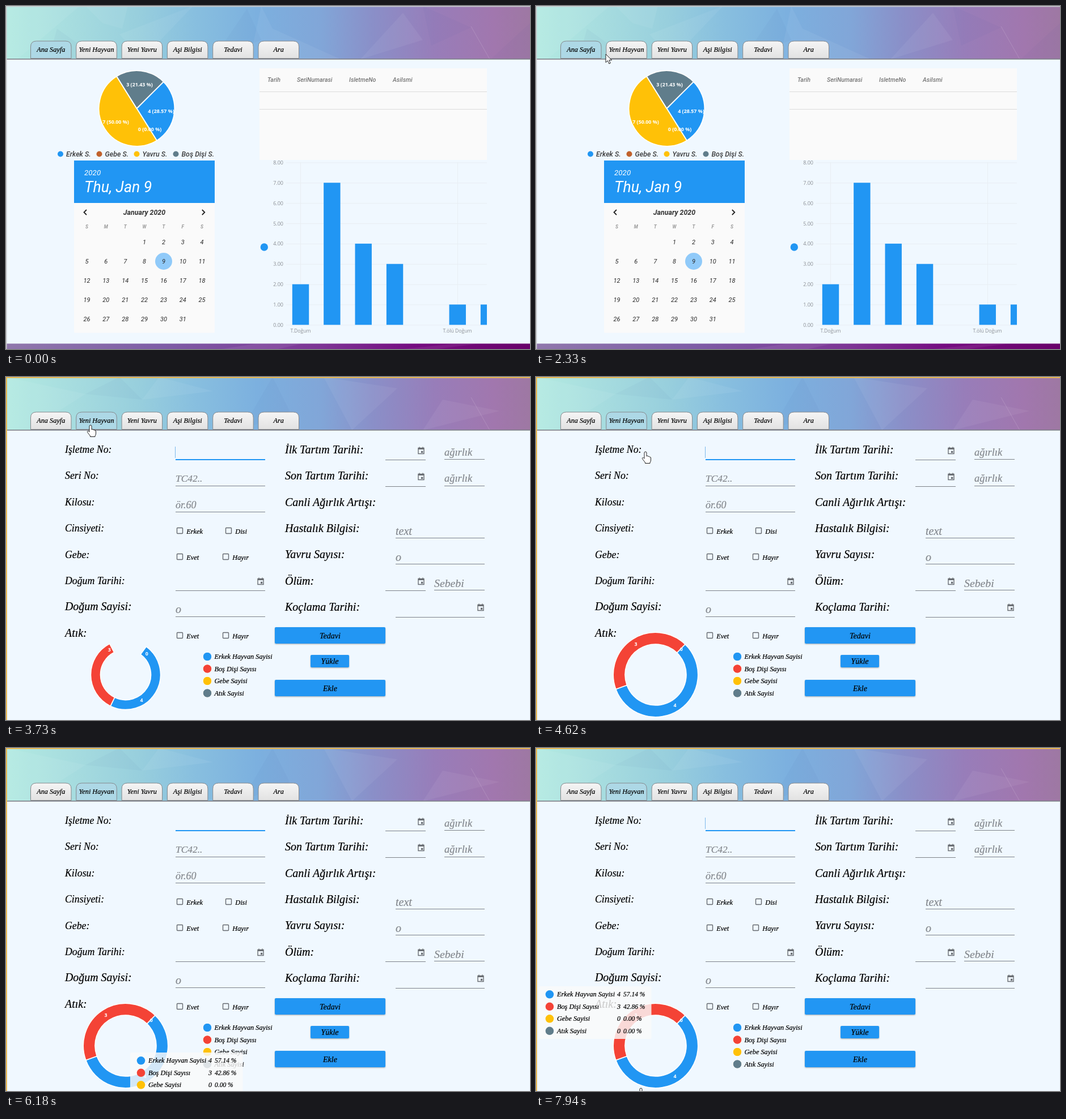
Animation, 924 px wide and 606 px high, one loop 7.99 s. Source, as an HTML page:

```html
<!DOCTYPE html>
<html lang="tr">
<head>
<meta charset="utf-8">
<title>Dashboard</title>
<style>
html, body { margin: 0; width: 100%; height: 100%; overflow: hidden; background: #f0f8ff; }
svg { display: block; width: 924px; height: 606px; }
text { white-space: pre; }
.serif { font-family: "Liberation Serif", serif; font-style: italic; stroke-width: .22px; }
.ui { font-family: Roboto, sans-serif; font-style: italic; stroke: none; }
.chart { font-family: "Open Sans", sans-serif; stroke: none; }
</style>
</head>
<body>
<svg id="stage" viewBox="0 0 924 606" xmlns="http://www.w3.org/2000/svg"></svg>
<script>
const LOOP = 7990, SWAP = 3450;
const BLUE = '#2196f3', RED = '#f44336', YELLOW = '#ffc107', SLATE = '#607d8b';

const txt = (x, y, s, size, cls = 'serif', fill = '#000', more = '') =>
  `<text x="${x}" y="${y}" font-size="${size}" class="${cls}" fill="${fill}" stroke="${fill}" ${more}>${s}</text>`;
const mid = 'text-anchor="middle"';
const rect = (x, y, w, h, fill, more = '') =>
  `<rect x="${x}" y="${y}" width="${w}" height="${h}" fill="${fill}" ${more}/>`;
const dot = (x, y, r, fill, more = '') => `<circle cx="${x}" cy="${y}" r="${r}" fill="${fill}" ${more}/>`;
const each = (list, fn) => list.map(fn).join('');
const grad = (id, stops, dir = '') => `<linearGradient id="${id}" ${dir}>` +
  each(stops, ([o, c]) => `<stop offset="${o}" stop-color="${c}"/>`) + '</linearGradient>';

// Angles in degrees, clockwise from the top
const polar = (cx, cy, r, deg) => {
  const a = deg * Math.PI / 180;
  return [(cx + r * Math.sin(a)).toFixed(2), (cy - r * Math.cos(a)).toFixed(2)];
};
function sector(cx, cy, r, hole, a, b) {
  const big = b - a > 180 ? 1 : 0, p = (rad, ang) => polar(cx, cy, rad, ang);
  const back = hole ? `L${p(hole, b)}A${hole} ${hole} 0 ${big} 0 ${p(hole, a)}` : `L${cx} ${cy}`;
  return `M${p(r, a)}A${r} ${r} 0 ${big} 1 ${p(r, b)}${back}Z`;
}

const defs = `<defs>
  ${grad('sky', [[0, '#b3eae1'], [.13, '#a6dcdf'], [.25, '#98cfdd'], [.36, '#88bfdf'], [.48, '#7cb0df'],
    [.6, '#81a6d8'], [.7, '#8a8fc8'], [.82, '#987db9'], [.93, '#a177ae'], [1, '#9e78a3']])}
  ${grad('foot', [[0, '#9078ac'], [.3, '#7e5da6'], [.6, '#7d3595'], [.78, '#750c80'], [1, '#69026a']])}
  ${grad('tab', [[0, '#f5f5f5'], [1, '#e2e2e2']], 'x2="0" y2="1"')}
  <clipPath id="top"><path d="M0 0H924V94H0Z"/></clipPath>
  <clipPath id="plot"><path d="M440 268H848V590H440Z"/></clipPath>
  <filter id="drop" x="-5%" y="-20%" width="110%" height="160%">
    <feDropShadow dx="0" dy="1" stdDeviation="1.2" flood-opacity=".32"/></filter>
</defs>`;

const skyHome = {
  lights: ['0 0 130 0 20 94 0 94', '140 0 215 0 205 40 170 30', '200 50 330 0 240 94',
    '450 0 470 40 590 94 430 94', '625 94 700 12 735 60'],
  darks: ['75 94 90 40 165 94', '365 94 425 5 450 60', '735 0 820 38 750 70', '855 94 924 30 924 94']
};
const skyForm = {
  lights: ['0 0 140 30 40 94 0 94', '270 0 365 25 240 40', '560 0 690 20 610 94', '770 40 870 60 735 94'],
  darks: ['140 30 200 0 240 40', '415 94 470 0 500 60']
};
const header = ({ lights, darks }) => `<g clip-path="url(#top)">${rect(0, 0, 924, 94, 'url(#sky)')}` +
  each(lights, p => `<polygon points="${p}" fill="#fff" opacity=".055"/>`) +
  each(darks, p => `<polygon points="${p}" fill="#35508c" opacity=".04"/>`) +
  '<path d="M820 36L853 94" stroke="#c4a9cf" stroke-width=".7" opacity=".6"/></g>' +
  rect(0, 93, 924, 1.6, '#7c7f86');

const tabNames = ['Ana Sayfa', 'Yeni Hayvan', 'Yeni Yavru', 'Aşi Bilgisi', 'Tedavi', 'Ara'];
const tabs = (active, id) => each(tabNames, (name, i) => {
  const x = 43.5 + i * 80.3;
  return `<path ${i === 1 ? `id="${id}"` : ''} d="M${x} 92.5V72q0-10 10-10h51.5q10 0 10 10V92.5z" ` +
    `fill="${i === active ? '#add8e6' : 'url(#tab)'}" stroke="#85888c"/>` +
    txt(x + 35.8, 81, name, 12.3, 'serif', '#000', mid);
});

function pie() {
  const parts = [[45, 148, BLUE], [148, 328, YELLOW], [328, 405, SLATE]];
  const labels = [[235.5, 142, '3 (21.43 %)'], [273.5, 189, '4 (28.57 %)'], [193.5, 208, '7 (50.00 %)'], [253.5, 221, '0 (0.00 %)']];
  const legend = [[96, 'Erkek S.', BLUE], [164.5, 'Gebe S.', '#c1622d'], [230.5, 'Yavru S.', YELLOW], [299.5, 'Boş Dişi S.', SLATE]];
  return each(parts, ([a, b, c]) =>
      `<path d="${sector(230.5, 181, 66.8, 0, a, b)}" fill="${c}" stroke="#fff" stroke-width="1.8" stroke-linejoin="round"/>`) +
    each(labels, ([x, y, s]) => txt(x, y, s, 8.9, 'chart', '#fff', mid + ' font-weight="700"')) +
    each(legend, ([x, s, c]) => dot(x, 261.5, 5, c) + txt(x + 10, 266, s, 12.4, 'ui', '#3c3c3c', 'font-weight="500"'));
}

function calendar() {
  const col = i => 142.5 + 33.85 * i;
  let out = rect(120, 273, 248, 304.5, '#fafafa', 'rx="2"') + rect(120, 273, 248, 75, BLUE) +
    txt(138, 299, '2020', 13.4, 'ui', '#fff') + txt(138, 328.5, 'Thu, Jan 9', 26.7, 'ui', '#fff') +
    txt(244, 369, 'January 2020', 12.4, 'ui', '#333', mid + ' font-weight="700"') +
    '<path d="M142 360l-4.5 4.5 4.5 4.5M345.8 360l4.5 4.5-4.5 4.5" fill="none" stroke="#222" stroke-width="1.8"/>' +
    each([...'SMTWTFS'], (d, i) => txt(col(i), 392.5, d, 8.3, 'ui', '#9a9a9a', mid + ' font-weight="700"')) +
    dot(278, 451, 15, '#90caf9');
  for (let d = 1; d <= 31; d++) {
    const cell = d + 2;
    out += txt(col(cell % 7), 421 + 34 * Math.floor(cell / 7), d, 11, 'ui', '#2b2b2b', mid);
  }
  return out;
}

function table() {
  const heads = [[461, 'Tarih'], [513, 'SeriNumarasi'], [605, 'IsletmeNo'], [682, 'AsiIsmi']];
  return rect(447, 110, 401, 162, '#fafafa') + rect(447, 151, 401, 1, '#dcdcdc') + rect(447, 182, 401, 1, '#dcdcdc') +
    each(heads, ([x, s]) => txt(x, 134, s, 10.6, 'ui', '#757575', 'font-weight="500"'));
}

function bars() {
  const y = v => 563.3 - v * 35.86;
  let out = '';
  for (let v = 0; v <= 8; v++)
    out += rect(494, y(v), 354, 1, '#e8eef3') + txt(489, y(v) + 3.5, v + '.00', 9, 'chart', '#8b8f94', 'text-anchor="end"');
  out += rect(519, 276, 1, 287, '#e8eef3') + rect(796, 276, 1, 287, '#e8eef3');
  out += each([2, 7, 4, 3, 0, 1, 1], (v, i) => rect(504.8 + i * 55.35, y(v), 29.4, v * 35.86, BLUE));
  out += txt(519.5, 577, 'T.Doğum', 8.6, 'chart', '#8b8f94', mid) + txt(796, 577, 'T.ölü Doğum', 8.6, 'chart', '#8b8f94', mid);
  return `<g clip-path="url(#plot)">${out}</g>` + dot(455.3, 426, 6.7, BLUE);
}

const home = header(skyHome) + tabs(0, 'hover') + pie() + calendar() + table() + bars() +
  rect(0, 596.5, 924, 9.5, 'url(#foot)') +
  '<path d="M380 606L440 597H520L480 606Z M700 606L790 597H830L760 606Z" fill="#fff" opacity=".07"/>';

const series = [['Erkek Hayvan Sayisi', BLUE, 4, '57.14 %'], ['Boş Dişi Sayısı', RED, 3, '42.86 %'],
  ['Gebe Sayisi', YELLOW, 0, '0.00 %'], ['Atık Sayisi', SLATE, 0, '0.00 %']];

function form() {
  const left = ['Işletme No:', 'Seri No:', 'Kilosu:', 'Cinsiyeti:', 'Gebe:', 'Doğum Tarihi:', 'Doğum Sayisi:', 'Atık:'];
  const right = ['İlk Tartım Tarihi:', 'Son Tartım Tarihi:', 'Canli Ağırlık Artışı:', 'Hastalık Bilgisi:', 'Yavru Sayısı:', 'Ölüm:', 'Koçlama Tarihi:'];
  const lines = [[299, 192, 158], [299, 238, 158], [299, 377, 158], [299, 423, 158], [669, 146, 71], [669, 193, 71], [669, 377, 71],
    [773, 145, 71], [773, 192, 71], [687, 284, 157], [687, 330, 157], [755, 376, 89], [687, 424, 157]];
  // Old-style zeros are drawn with the low round letter
  const hints = [[299, 185, 'TC42..', 17.4], [299, 231.5, 'ör.60', 18], [299, 417, 'o', 20], [773, 139, 'ağırlık', 18.4],
    [773, 185, 'ağırlık', 18.4], [687, 278.5, 'text', 20], [687, 325, 'o', 20], [755, 370.5, 'Sebebi', 19.8]];
  const icons = [[449, 361], [732, 130], [732, 176], [732, 361], [837, 407]];
  const boxes = [[306.5, 271.5, 'Erkek'], [392.5, 271.5, 'Disi'], [306.5, 317.5, 'Evet'], [387.5, 317.5, 'Hayır'], [306.5, 456.5, 'Evet'], [387.5, 456.5, 'Hayır']];
  const buttons = [[474, 442, 195, 29, 'Tedavi'], [537, 491, 68, 22, 'Yükle'], [474, 535, 195, 29, 'Ekle']];
  return each(left, (s, i) => txt(104, 134 + i * 46.4, s, i > 5 ? 19.9 : 17.8)) +
    each(right, (s, i) => txt(492, 135 + i * 46.3, s, 20)) +
    each(lines, ([x, y, w]) => rect(x, y, w, 1, '#7d8288')) + rect(299, 145, 158, 2, BLUE) +
    each(hints, ([x, y, s, size]) => txt(x, y, s, size, 'serif', '#84888d')) +
    each(icons, ([x, y]) => `<path transform="translate(${x} ${y})" d="M-5-4.5H5V5.5H-5ZM-3-6.5V-4M3-6.5V-4" fill="none" stroke="#6a6e73" stroke-width="1.4"/>` +
      rect(x - 5, y - 5, 10, 3, '#6a6e73') + rect(x, y + .7, 3.3, 3.3, '#6a6e73')) +
    each(boxes, ([x, y, s]) => rect(x - 5, y - 5, 10, 10, 'none', 'rx="1" stroke="#666a6f" stroke-width="1.4"') + txt(x + 11.8, y + 5, s, 12.3)) +
    each(buttons, ([x, y, w, h, s]) => rect(x, y, w, h, BLUE, 'rx="2" filter="url(#drop)"') + txt(x + w / 2, y + h / 2 + 5, s, 14, 'serif', '#000', mid)) +
    each(series, ([s, c], i) => dot(355, 494 + i * 21.5, 7.8, c, 'stroke="#fff" stroke-width="1"') + txt(367.5, 498 + i * 21.5, s, 12.25)) +
    rect(298, 123, 1, 20, '#7db9ec', 'id="caret"');
}

const tip = rect(0, 0, 198.5, 93, '#fafafa', 'fill-opacity=".82" rx="2"') + each(series, ([s, c, n, pct], i) => {
  const y = 14.3 + i * 21.5;
  return dot(19, y, 7.3, c) + txt(32, y + 4, s, 12.25) + txt(138, y + 4, n, 12) + txt(149, y + 4, pct, 11.5);
});

const stage = document.getElementById('stage');
stage.innerHTML = defs + rect(0, 0, 924, 606, '#f0f8ff') +
  `<g id="home">${home}</g>
   <g id="form">${header(skyForm)}${tabs(1, 'current')}${form()}<g id="donut"></g></g>
   <path d="M0 .5H924M.5 0V606" stroke="#c9cccf" stroke-width="2"/>
   <path id="edge" d="M0 .5H924M.5 0V606" stroke="#edb848" stroke-width="2.6"/>
   <g id="tip">${tip}</g>
   <g id="cursor" stroke="#222" stroke-width="1" stroke-linejoin="round" fill="#fff">
     <path id="arrow" d="M0 0V14.8L3.4 11.6 5.8 17 8.2 16 5.9 10.7H10.5Z"/>
     <path id="hand" d="M-2 2a2 2 0 0 1 4 0v6l1-.6q1.6-.5 2 1 2-.7 2.5 1 2-.3 2 1.6v4q0 2-1.5 4v1.5h-8.5v-1.5q-2-2.5-5-6.5-.8-1.8 1-2 1.2 0 2.5 1.6z"/>
   </g>`;
const $ = id => document.getElementById(id);
const show = (id, on) => { $(id).style.display = on ? '' : 'none'; };

// Rows are [time, x, y]
const mouse = [[0, 690, 620], [770, 690, 608], [1100, 420, 330], [1540, 70, 91], [1740, 70, 91], [1790, 70, 86], [2030, 70, 86],
  [2330, 123, 85], [2650, 149, 85], [4010, 149, 85], [4090, 152, 87], [4290, 152, 87], [4620, 193, 132], [5060, 208, 437],
  [5430, 210, 482], [5850, 281, 508], [6030, 272, 612], [7050, 280, 612], [7300, 277, 520], [7550, 200, 468],
  [7700, 148, 505], [7840, 168, 570], [7940, 185, 601], [7990, 185, 601]];
const tipMove = [[0, 219, 538], [7100, 202, 500], [7700, 5, 421], [7990, 5, 421]];

function at(track, t) {
  const i = Math.max(1, track.findIndex(k => k[0] > t));
  const [t0, x0, y0] = track[i - 1], [t1, x1, y1] = track[i];
  const p = (t - t0) / (t1 - t0), s = p * p * (3 - 2 * p);
  return [x0 + (x1 - x0) * s, y0 + (y1 - y0) * s];
}

let drawn = -1;
function donut(p) {
  if (p === drawn) return;
  drawn = p;
  const ring = (a, b, c) => `<path d="${sector(211, 526, 74.7 * p, 54 * p, a * p, b * p)}" fill="${c}" stroke="#fff" stroke-width="1.6"/>`;
  const label = (a, s) => {
    const [x, y] = polar(211, 526, 64 * p, a);
    return txt(x, +y + 3, s, 8.8, 'chart', '#fff', mid + ' font-weight="700"');
  };
  $('donut').innerHTML = p < .02 ? '' :
    ring(44, 250, BLUE) + ring(250, 404, RED) + label(148, 4) + label(327, 3) + label(45, 0);
}

function draw(t) {
  const onForm = t >= SWAP, [x, y] = at(mouse, t);
  show('home', !onForm);
  show('form', onForm);
  $('edge').style.opacity = t < 3130 ? 0 : Math.min(1, (t - 3070) / 120);
  const over = x >= 125 && t > 2030;
  $('hover').setAttribute('fill', over ? '#add8e6' : 'url(#tab)');
  show('arrow', !over);
  show('hand', over);
  $('cursor').setAttribute('transform', `translate(${x.toFixed(1)} ${y.toFixed(1)})`);
  if (onForm) {
    donut(1 - Math.pow(1 - Math.min(1, (t - SWAP) / 410), 1.5));
    show('caret', Math.floor((t - 3525) / 530) % 2 === 0);
  }
  const early = t >= 5230 && t < 6470;
  show('tip', early || t >= 7150);
  const [tx, ty] = early ? [219, 538] : at(tipMove, t);
  $('tip').setAttribute('transform', `translate(${tx.toFixed(1)} ${ty.toFixed(1)})`);
}

const start = performance.now();
function tick() {
  draw((performance.now() - start) % LOOP);
  requestAnimationFrame(tick);
}
tick();
</script>
</body>
</html>
```
